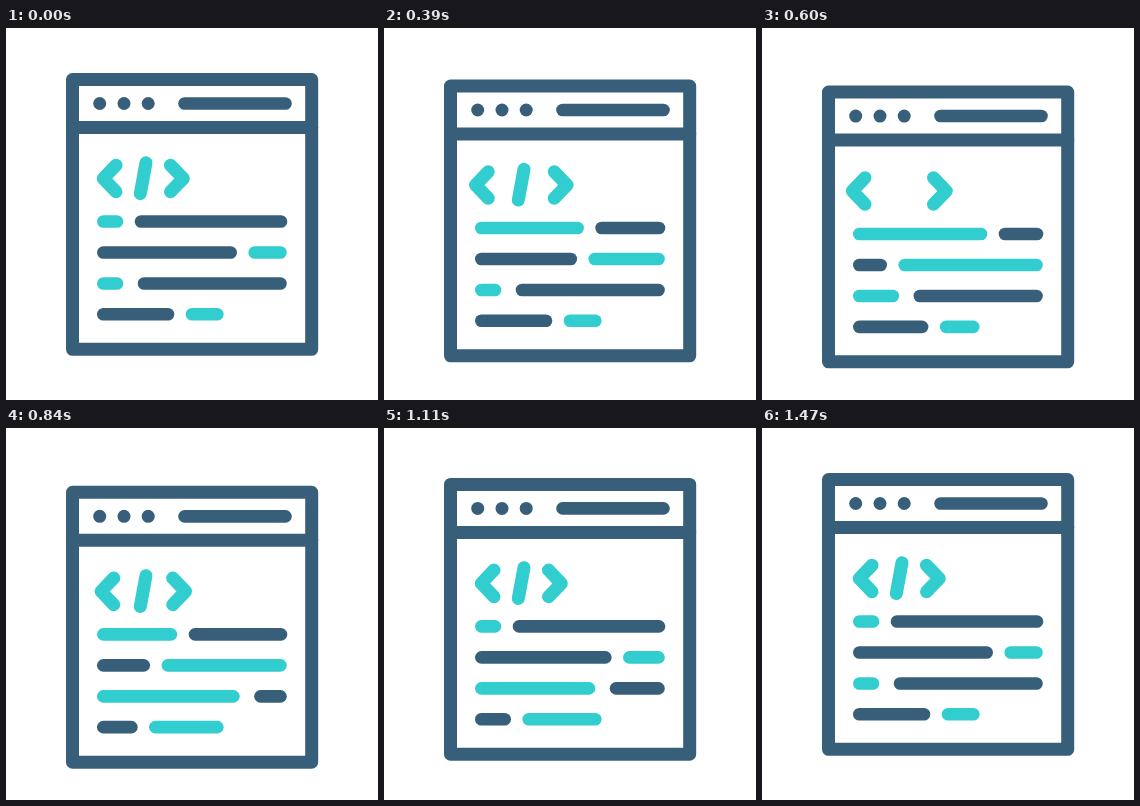
An HTML page with a canvas for the animation above (1.5 s loop, 372 by 372 pixels).

```html
<!DOCTYPE html>
<html lang="en">
<head>
<meta charset="utf-8">
<title>Code window</title>
<style>
  html, body { margin: 0; width: 100%; height: 100%; overflow: hidden; background: #fff; }
  canvas { display: block; width: 372px; height: 372px; }
</style>
</head>
<body>
<canvas id="stage" width="372" height="372"></canvas>
<script>
const ctx = document.getElementById('stage').getContext('2d');
const DARK = '#385f7a', TEAL = '#32cdce';
const LOOP = 1500, STEP = 30;
const LEFT = 97.3, BAR = 12.6, FRAME = 13;

const cubic = p => p < 0.5 ? 4 * p ** 3 : 1 - 4 * (1 - p) ** 3;
const quad = p => p < 0.5 ? 2 * p * p : 1 - 2 * (1 - p) ** 2;
const ramp = (t, from, to, ease) => ease(Math.min(1, Math.max(0, (t - from) / (to - from))));

// Rises from 0 to 1, then falls back to 0.
const swing = (t, start, peak, turn, end, easeBack = cubic) =>
  ramp(t, start, peak, cubic) - ramp(t, turn, end, easeBack);

// Split positions are the centre of the first bar's right cap.
const rows = [
  { y: 193.5, end: 275, split: 111, travel: 108, gap: 24, colors: [TEAL, DARK], timing: [60, 600, 600, 1080] },
  { y: 224.5, end: 274.5, split: 224.7, travel: -108, gap: 24, colors: [DARK, TEAL], timing: [150, 690, 690, 1170, quad] },
  { y: 255.5, end: 274.5, split: 111, travel: 118.5, gap: 27, colors: [TEAL, DARK], timing: [430, 920, 920, 1430] },
  { y: 286.3, end: 211.3, split: 162, travel: -43, gap: 24, colors: [DARK, TEAL], timing: [480, 1020, 1020, 1440] }
];

function stroke(color, width, ...points) {
  ctx.strokeStyle = color;
  ctx.lineWidth = width;
  ctx.beginPath();
  points.forEach(([x, y]) => ctx.lineTo(x, y));
  ctx.stroke();
}

function drawWindow() {
  ctx.strokeStyle = DARK;
  ctx.lineWidth = FRAME;
  ctx.strokeRect(66.5, 51.5, 239.2, 269.8);
  stroke(DARK, FRAME, [66.5, 99.5], [305.7, 99.5]);
  stroke(DARK, BAR, [178.5, 75.5], [279.5, 75.5]);
  ctx.fillStyle = DARK;
  for (const x of [93.7, 118, 142.2]) {
    ctx.beginPath();
    ctx.arc(x, 75.5, 6.5, 0, 2 * Math.PI);
    ctx.fill();
  }
}

function drawTag(t) {
  const spread = 7 * swing(t, 60, 570, 600, 1020);
  const chevron = (tip, back) =>
    stroke(TEAL, FRAME, [back, 137.2], [tip, 150.5], [back, 163.8]);
  chevron(97.3 - spread, 110 - spread);
  chevron(177.3 + spread, 164.5 + spread);
  const slashHidden = t >= 540 && t < 690;
  if (!slashHidden) stroke(TEAL, FRAME, [140, 134.8], [134.3, 165.6]);
}

function drawRow(row, t) {
  const split = row.split + row.travel * swing(t, ...row.timing);
  stroke(row.colors[0], BAR, [LEFT, row.y], [split, row.y]);
  stroke(row.colors[1], BAR, [split + row.gap, row.y], [row.end, row.y]);
}

function draw(t) {
  ctx.fillStyle = '#fff';
  ctx.fillRect(0, 0, 372, 372);
  ctx.save();
  ctx.translate(0, 13 * swing(t, 30, 750, 750, 1410));
  drawWindow();
  drawTag(t);
  rows.forEach(row => drawRow(row, t));
  ctx.restore();
}

ctx.lineCap = ctx.lineJoin = 'round';
const origin = performance.now();
function tick() {
  const t = (performance.now() - origin) % LOOP;
  draw(Math.floor(t / STEP) * STEP);
  requestAnimationFrame(tick);
}
tick();
</script>
</body>
</html>
```
